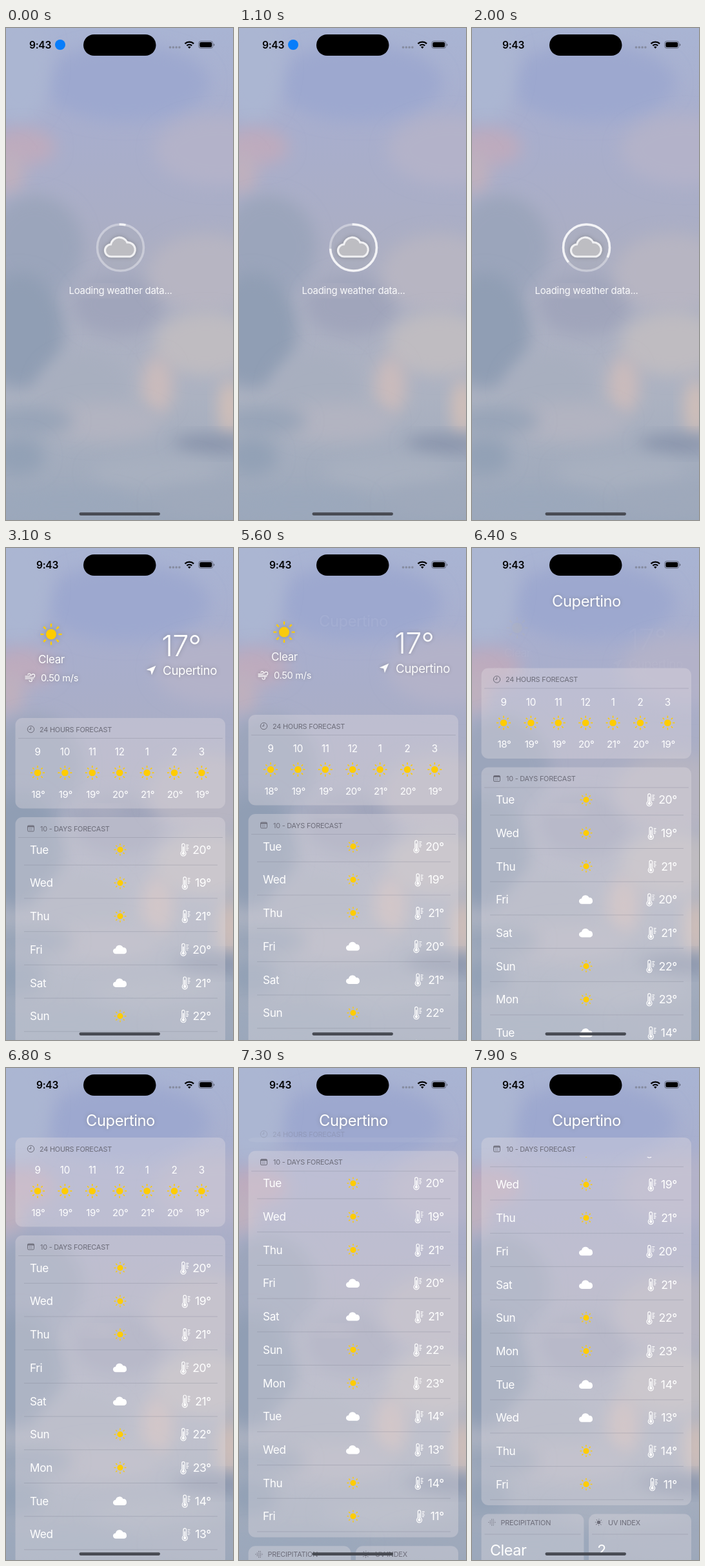
Recreate the animation shown at these times as an HTML page. Size 352 px wide and 764 px high, loop 8 s.

```html
<!DOCTYPE html>
<html lang="en">
<head>
<meta charset="utf-8">
<title>Weather</title>
<style>
html, body { margin: 0; width: 100%; height: 100%; overflow: hidden; background: #a6aec6; }
svg { display: block; width: 352px; height: 764px; }
text { font-family: Inter, Roboto, sans-serif; letter-spacing: -.02em; fill: #fff; }
.label { font-size: 10.9px; fill: #6c6c79; }
.line { stroke: #777b8a; stroke-opacity: .38; stroke-width: .8; }
.card { fill: #dfdbe0; fill-opacity: .36; }
.ink { fill: none; stroke: #6c6c79; }
.pen { fill: none; stroke: #fff; stroke-linecap: round; stroke-linejoin: round; }
.mid { text-anchor: middle; }
.end { text-anchor: end; }
.soft { filter: drop-shadow(0 0 3px #5556); }
</style>
</head>
<body>
<svg id="stage" viewBox="0 0 352 764"></svg>
<script>
const LOOP = 8000;
const clouds = [
  [185, 85, 130, 60, '#9da8cf'], [20, 60, 50, 90, '#abb6d2'], [330, 190, 100, 55, '#b3b2c9'],
  [25, 185, 52, 30, '#bdabbe'], [5, 225, 22, 35, '#c0b0bd'], [45, 340, 75, 80, '#9ba5bb'],
  [20, 470, 70, 90, '#909eb4'], [175, 430, 72, 48, '#a0a5bb'], [310, 380, 90, 60, '#b7b5c2'],
  [310, 490, 80, 50, '#bfbcc1'], [120, 560, 70, 55, '#a8afbf'], [235, 555, 24, 45, '#cabbbc'],
  [150, 612, 90, 30, '#b2b4c1'], [348, 590, 18, 45, '#d2bfb8'], [40, 610, 65, 22, '#98a4b8'],
  [320, 646, 62, 14, '#8793aa'], [20, 665, 40, 30, '#93a1b6'], [230, 690, 100, 25, '#a8b0c0'],
  [90, 740, 110, 24, '#9ba8bc'], [310, 735, 80, 25, '#9fa9bb'], [152, 408, 30, 6, '#b6b5c4']
];
const hours = ['9', '10', '11', '12', '1', '2', '3'];
const hourTemps = [18, 19, 19, 20, 21, 20, 19];
const days = 'Tue Wed Thu Fri Sat Sun Mon Tue Wed Thu Fri'.split(' ');
const dayTemps = [20, 19, 21, 20, 21, 22, 23, 14, 13, 14, 11];
const cloudy = [3, 4, 7, 8];
// time in ms, scroll distance
const scrollKeys = [[5500, 0], [5600, 5], [6100, 40], [6500, 90], [6800, 158],
  [7100, 240], [7400, 314], [7500, 320], [7600, 320], [7900, 339]];

const text = (x, y, size, s, more = '') => `<text x="${x}" y="${y}" font-size="${size}" ${more}>${s}</text>`;
const label = (x, y, s) => `<text x="${x}" y="${y}" class="label">${s}</text>`;
const line = (x1, x2, y) => `<path class="line" d="M${x1} ${y}H${x2}"/>`;
const at = (x, y, s, k = 1) => `<g transform="translate(${x} ${y}) scale(${k})">${s}</g>`;
const each = (list, f) => list.map(f).join('');

const sun = (x, y, k, color = '#fc0') => at(x, y, `<circle r="8" fill="${color}"/>
  <circle r="14" fill="none" stroke="${color}" stroke-width="5" pathLength="8"
    stroke-dasharray=".22 .78" stroke-dashoffset=".11"/>`, k);
const cloudPath = 'M-14.5 15A9.5 9.5 0 0 1-15.5-4A13.5 13.5 0 0 1 10-7A11.3 11.3 0 0 1 14.5 15Z';
const cloud = (x, y) => at(x, y, `<path d="${cloudPath}" fill="#fff"/>`, .45);
const thermometer = (x, y) => at(x, y, `<path class="pen" stroke-width="1.2"
  d="M-4.2 2.5V-7a2.2 2.2 0 0 1 4.4 0V2.5a4 4 0 1 1-4.4 0M2.8-7h3M2.8-4.5h2M2.8-2h3M2.8 .5h2"/>
  <path class="pen" stroke-width="1.6" d="M-2-4V5"/><circle cx="-2" cy="5.8" r="2.2" fill="#fff"/>`);
const arrow = (x, y, k) => at(x, y, '<path fill="#fff" d="M8-8L1 8L-.8 .8L-8-1Z"/>', k);
const wind = at(37, 201, `<path class="pen" stroke-width="1.2"
  d="M-7-2H-1a2 2 0 1 0-2-2.2M-7 0H5a2.6 2.6 0 1 0-2.6-3M-7 2H1a2.2 2.2 0 1 1-2 2.6M2.5 2H6"/>`);
const clock = at(38.5, 17.5, '<circle class="ink" r="5.2"/><path class="ink" d="M0-3.4V0H-2.8"/>');
const calendar = at(38.5, 17.5, `<rect class="ink" x="-5" y="-4.5" width="10" height="9" rx="1.5"/>
  <path class="ink" stroke-width="2" d="M-5-3H5"/><path class="ink" stroke-dasharray="1 1" d="M-3 0H3M-3 2.2H3"/>`);
const drops = at(31, 13, each([-4.5, -2.2, 0, 2.2, 4.5], y =>
  `<path class="ink" stroke-width="1.1" stroke-dasharray="1.1 1.4" d="M${Math.abs(y) - 5.5} ${y}H${5.5 - Math.abs(y) / 2}"/>`));

const card = (id, head, body) => `<g id="${id}"><rect class="card" x="14.5" width="325.5" rx="11"/>
  <g class="head">${head}</g><g clip-path="url(#below)"><g class="body">${body}</g></g></g>`;

const hourBody = line(19, 336, 295.5) + each(hours, (h, i) => {
  const x = 49 + 42.4 * i;
  return text(x, 322, 15.2, h, 'class="mid"') + sun(x, 349, .66) +
    text(x + 1, 387.5, 15, hourTemps[i] + '°', 'class="mid"');
});
const dayBody = line(19, 336, 449.5) + each(days, (d, i) => {
  const y = 468.4 + 51.7 * i, temp = String(dayTemps[i]);
  const ones = temp.split('1').length - 1;
  return text(37, y + 6.3, 17.2, d) + (cloudy.includes(i) ? cloud(177, y) : sun(177, y, .57)) +
    thermometer(277 + 2.3 * ones, y) + text(318, y + 6.3, 17.6, temp + '°', 'class="end"') +
    line(28, 328, 492.3 + 51.7 * i);
});
const tile = (x, icon, title, value, vx) => `<rect class="card" x="${x}" width="159" height="150" rx="11"/>` +
  icon + label(x + 30, 17.3, title) + line(x + 5, x + 154, 31.5) + text(vx, 64, 23.4, value);

const stage = document.getElementById('stage');
stage.innerHTML = `<defs>
  <linearGradient id="sky" x2="0" y2="1"><stop stop-color="#a9b4d3"/><stop offset=".2" stop-color="#a8aecd"/>
    <stop offset=".45" stop-color="#abaec3"/><stop offset=".75" stop-color="#acb2c1"/><stop offset="1" stop-color="#9ba7ba"/></linearGradient>
  <filter id="blur" x="-50%" y="-50%" width="200%" height="200%"><feGaussianBlur stdDeviation="13"/></filter>
  <clipPath id="below"><rect y="138" width="352" height="626"/></clipPath></defs>
<rect width="352" height="764" fill="url(#sky)"/>
${each(clouds, ([x, y, rx, ry, c]) => `<ellipse cx="${x}" cy="${y}" rx="${rx}" ry="${ry}" fill="${c}" filter="url(#blur)"/>`)}
<g id="loading">
  <circle cx="177.5" cy="341" r="36" fill="#aaa" fill-opacity=".18" stroke="#fff" stroke-opacity=".36" stroke-width="3.5"/>
  <circle id="ring" cx="177.5" cy="341" r="36" fill="none" stroke="#fff" stroke-opacity=".78" stroke-width="3.5"
    pathLength="360" transform="rotate(-90 177.5 341)"/>
  <g class="soft">${at(178, 340, `<path d="${cloudPath}" fill="#bdbdc2" stroke="#f1f1f3" stroke-width="3.2"/>`)}</g>
  ${text(177.5, 412.7, 15, 'Loading weather data...', 'class="mid" fill-opacity=".93"')}
</g>
<g id="main">
  <g id="now"><g class="soft">
    ${sun(70, 134, 1)}${text(70.5, 178.5, 17, 'Clear', 'class="mid"')}
    ${wind}${text(54, 206.5, 14.6, '0.50 m/s')}
    ${text(302, 167.5, 45, '17°', 'class="end" font-weight="300"')}
    ${arrow(225, 190, .92)}${text(327, 197, 18.7, 'Cupertino', 'class="end"')}
  </g></g>
  ${text(177.5, 90, 23.8, 'Cupertino', 'class="mid soft" id="title"')}
  ${card('hourly', clock + label(52, 21.7, '24 HOURS FORECAST'), hourBody)}
  ${card('daily', calendar + label(53, 21.7, '10 - DAYS FORECAST'), dayBody)}
  <g id="tiles">${tile(14.5, drops, 'PRECIPITATION', 'Clear', 28)}
    ${tile(181, sun(196.5, 13, .34, '#6c6c79'), 'UV INDEX', '2', 194)}</g>
</g>
<text id="clock" class="mid" y="31.8" style="fill:#000" font-size="15.6" font-weight="600">9:43</text>
<circle id="locate" cx="84" cy="26" r="8" fill="#087dfa"/>
<rect x="120" y="10" width="112.5" height="33" rx="16.5"/>
${each([254.5, 259.3, 264.1, 268.9], x => `<circle cx="${x}" cy="30" r="1.8" fill="#858b9f"/>`)}
<g fill="none" stroke="#000" stroke-width="2.3"><path d="M277.5 24.3a9.8 9.8 0 0 1 13.6 0M280.4 27.4a5.7 5.7 0 0 1 7.8 0"/></g>
<path d="M284.3 32l-2.2-2.4a3.2 3.2 0 0 1 4.4 0z"/>
<rect x="298.8" y="20.5" width="22" height="11" rx="3.4" fill="none" stroke="#000" stroke-opacity=".4"/>
<rect x="300.3" y="22" width="19" height="8" rx="2.2"/>
<path d="M322 24.2a2 2 0 0 1 0 3.8z" fill-opacity=".45"/>
<rect x="113.5" y="752.3" width="125.5" height="4.6" rx="2.3" fill="#484b53"/>`;

const $ = s => stage.querySelector(s);
const set = (s, attrs) => { for (const k in attrs) $(s).setAttribute(k, attrs[k]); };
const clamp = v => Math.max(0, Math.min(1, v));
const shift = y => `translate(0 ${y})`;

function scrollAt(t) {
  const i = scrollKeys.findIndex(k => k[0] >= t);
  if (i < 1) return 0;
  const [t0, s0] = scrollKeys[i - 1], [t1, s1] = scrollKeys[i];
  return s0 + (s1 - s0) * (t - t0) / (t1 - t0);
}

// The header stays pinned below the title while its rows slide under it.
function placeCard(id, top, bottom, s) {
  const y = Math.max(top - s, 108), left = bottom - s - 108;
  const lift = Math.min(0, left - 30);
  set(id, { opacity: clamp(left / 28) });
  set(id + ' .card', { y, height: Math.max(bottom - s - y, 0) });
  set(id + ' .head', { transform: shift(y + lift) });
  set(id + ' .body', { transform: shift(-s) });
}

function draw(t) {
  const sec = t / 1000, tail = Math.max(0, 360 * (sec - 1.35));
  const arc = Math.max(0, Math.min(360, 16 + 231 * sec - tail));
  const ready = t < 3000 ? 0 : t < 3100 ? .6 : 1;
  set('#loading', { opacity: 1 - ready });
  set('#main', { opacity: ready });
  if (t < 3100) {
    const held = Math.min(sec, 2), end = Math.max(0, 360 * (held - 1.35));
    const span = t < 2000 ? arc : 16 + 231 * held - end;
    set('#ring', { 'stroke-dasharray': `${span} ${360 - span}`, 'stroke-dashoffset': 3 - end });
  }
  const gone = clamp((t - 1600) / 400);
  set('#clock', { x: 53 + 11 * gone });
  set('#locate', { opacity: 1 - gone, r: 8 - 3 * gone });

  const s = scrollAt(t), p = clamp(s / 80);
  set('#now', { opacity: 1 - p, transform: shift(-10 * (1 - Math.exp(-s / 12))) });
  set('#title', { opacity: p, transform: shift(34 * (1 - p)) });
  placeCard('#hourly', 264, 404.5, s);
  placeCard('#daily', 418, 1018, s);
  set('#tiles', { transform: shift(1031.5 - s) });
}

function frame() {
  // The motion advances in steps of a tenth of a second.
  draw(Math.floor(performance.now() % LOOP / 100) * 100);
  requestAnimationFrame(frame);
}
frame();
</script>
</body>
</html>
```
